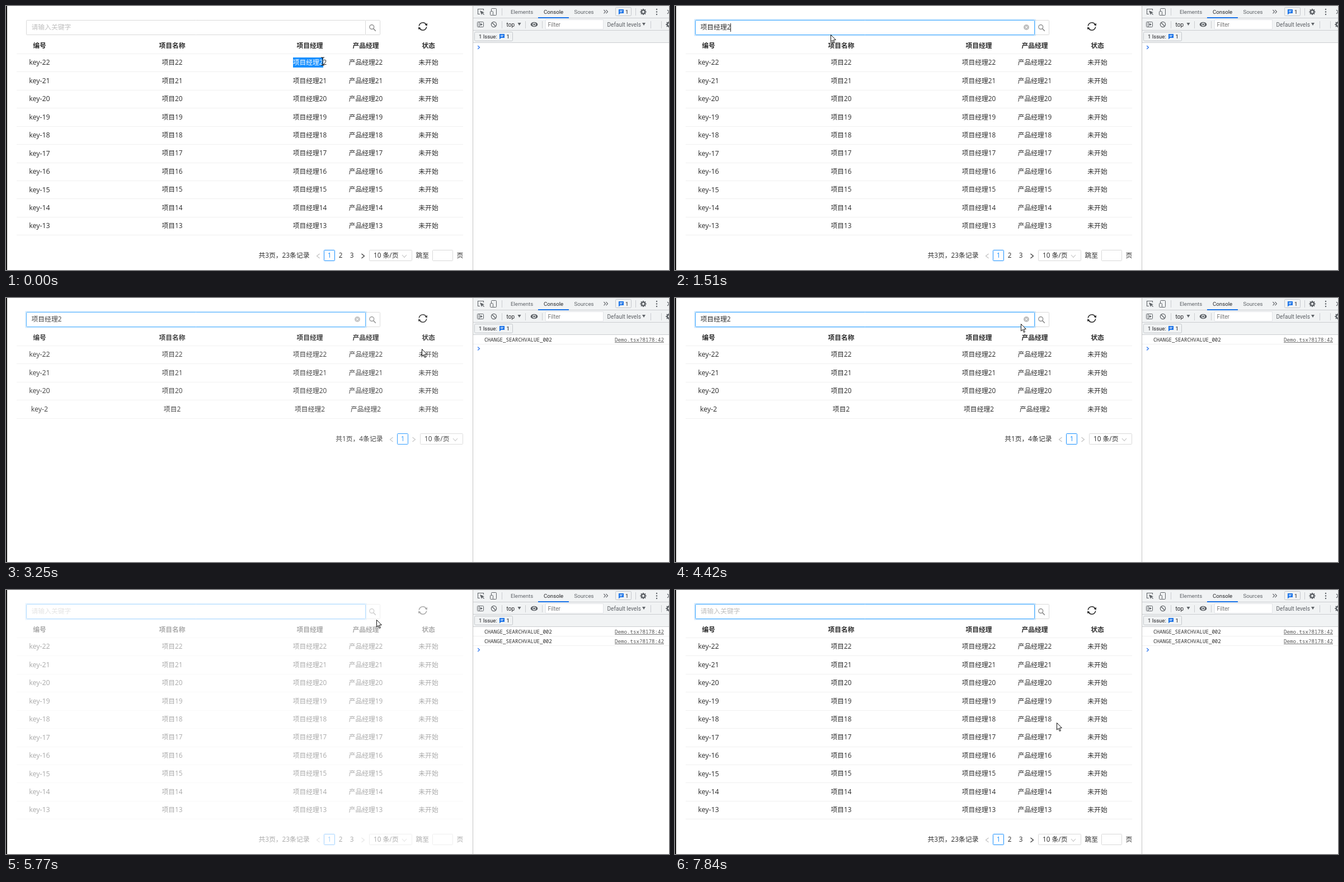
An HTML page with a canvas for the animation above (7.99 s loop, 1185 by 472 pixels).

```html
<!DOCTYPE html>
<html lang="zh">
<head>
<meta charset="utf-8">
<title>Table search</title>
<style>
html, body { margin: 0; width: 100%; height: 100%; overflow: hidden; background: #fff; }
canvas { display: block; width: 1185px; height: 472px; }
</style>
</head>
<body>
<canvas id="stage"></canvas>
<script>
const W = 1185, H = 472, LOOP = 7990;
const canvas = document.getElementById('stage');
const dpr = window.devicePixelRatio || 1;
canvas.width = W * dpr;
canvas.height = H * dpr;
const c = canvas.getContext('2d');

const CJK = "'Open Sans', 'Noto Sans CJK SC', 'Noto Sans CJK', sans-serif";
const UI = "Roboto, 'Noto Sans', sans-serif";
const MONO = "'Noto Sans Mono', 'DejaVu Sans Mono', monospace";
const INK = '#2b2b2b', BLUE = '#1890ff', LINE = '#d9d9d9', PALE = '#bfbfbf', ICON = '#5f6368';
const COLS = [60, 297, 543, 643, 755];
const HEADS = ['编号', '项目名称', '项目经理', '产品经理', '状态'];
const FULL = [22, 21, 20, 19, 18, 17, 16, 15, 14, 13];
const FOUND = [22, 21, 20, 2];

const BURSTS = [0, 280, 670, 1900, 2050, 2320, 2470, 2740, 3130, 3400, 3910, 4180, 4570,
  4720, 4870, 5260, 5770, 6040, 6430, 6700, 7330, 7840, LOOP];

// Pointer path: time, x, y, shape from that time on
const PATH = [
  [0, 566, 99, 'beam'], [160, 566, 99, 'beam'], [520, 549, 91, 'beam'], [670, 525, 80, 'arrow'],
  [910, 330, 44, 'beam'], [1030, 284, 40, 'beam'], [1270, 279, 42, 'beam'], [1390, 278, 46, 'beam'],
  [1510, 278, 51, 'arrow'], [1750, 622, 70, 'arrow'], [1900, 640, 51, 'arrow'], [2050, 652, 41, 'hand'],
  [2320, 654, 40, 'hand'], [2470, 729, 91, 'arrow'], [2980, 743, 91, 'arrow'], [3400, 743, 91, 'arrow'],
  [3760, 759, 89, 'arrow'], [4030, 723, 82, 'arrow'], [4420, 618, 46, 'arrow'], [4570, 629, 40, 'hand'],
  [4720, 629, 38, 'hand'], [4990, 630, 39, 'hand'], [5110, 638, 45, 'arrow'], [5260, 650, 50, 'arrow'],
  [5620, 662, 53, 'arrow'], [6280, 662, 53, 'arrow'], [6430, 686, 200, 'arrow'], [6550, 608, 335, 'arrow'],
  [6700, 598, 370, 'arrow'], [6940, 560, 414, 'arrow'], [7060, 545, 417, 'arrow'], [7210, 545, 417, 'arrow'],
  [7450, 590, 418, 'arrow'], [7690, 637, 390, 'beam'], [7840, 682, 237, 'arrow'], [LOOP, 682, 237, 'arrow']
];

const within = (t, a, b) => t >= a && t < b;
const ramp = (t, a, b) => Math.min(1, Math.max(0, (t - a) / (b - a)));

function snap(t) {
  const i = BURSTS.findIndex((s, k) => within(t, s, BURSTS[k + 1]));
  const start = BURSTS[i];
  const last = Math.max(0, Math.floor((BURSTS[i + 1] - start) / 120) - 1);
  return start + 120 * Math.min(last, Math.floor((t - start) / 120));
}

function rect(x, y, w, h, fill) {
  c.fillStyle = fill;
  c.fillRect(x, y, w, h);
}

function box(x, y, w, h, stroke, fill, r = 1) {
  c.beginPath();
  c.roundRect(x + .5, y + .5, w - 1, h - 1, r);
  if (fill) { c.fillStyle = fill; c.fill(); }
  c.strokeStyle = stroke;
  c.lineWidth = 1;
  c.stroke();
}

function label(s, x, y, { size = 11.8, font = CJK, color = INK, align = 'left', weight = '' } = {}) {
  c.font = `${weight} ${size}px ${font}`;
  c.fillStyle = color;
  c.textAlign = align;
  c.fillText(s, x, Math.round(y + size * .36));
}

function poly(pts, stroke, width = 1, fill, close) {
  c.beginPath();
  for (let i = 0; i < pts.length; i += 2) c.lineTo(pts[i], pts[i + 1]);
  if (close) c.closePath();
  if (fill) { c.fillStyle = fill; c.fill(); }
  if (stroke) { c.strokeStyle = stroke; c.lineWidth = width; c.stroke(); }
}

function arc(x, y, r, stroke, width = 1, a = 0, b = 2 * Math.PI) {
  c.beginPath();
  c.arc(x, y, r, a, b);
  c.strokeStyle = stroke;
  c.lineWidth = width;
  c.stroke();
}

function dot(x, y, r, fill) {
  c.beginPath();
  c.arc(x, y, r, 0, 2 * Math.PI);
  c.fillStyle = fill;
  c.fill();
}

// Angle bracket pointing left (-1) or right (1)
const angle = (x, y, dir, color) =>
  poly([x - 2.5 * dir, y - 4, x + 2.5 * dir, y, x - 2.5 * dir, y + 4], color, 1.1);

function refreshIcon(x, y) {
  for (const turn of [0, Math.PI]) {
    c.save();
    c.translate(x, y);
    c.rotate(turn);
    arc(0, 0, 6.8, INK, 1.5, Math.PI * 1.04, Math.PI * 1.86);
    poly([8.2, -5.6, 7.6, -.8, 3.4, -3], null, 0, INK, true);
    c.restore();
  }
}

function searchBar(t) {
  const hasText = within(t, 1390, 4870);
  const focus = ramp(t, 950, 1200);
  box(642, 25, 27, 27, within(t, 2050, 2590) ? '#40a9ff' : LINE);
  box(36, 25, 607, 27, LINE, '#fff');
  if (focus) {
    c.globalAlpha = focus;
    c.strokeStyle = 'rgba(24,144,255,.2)';
    c.lineWidth = 1.6;
    c.strokeRect(35.2, 24.2, 608.6, 28.6);
    box(36, 25, 607, 27, '#40a9ff');
    c.globalAlpha = 1;
  }
  arc(653.8, 37.5, 3.9, '#7d7d7d', 1.2);
  poly([656.7, 40.5, 660.8, 44.8], '#7d7d7d', 1.4);

  label(hasText ? '项目经理2' : '请输入关键字', 45.5, 38, { color: hasText ? INK : PALE });
  if (hasText) {
    dot(628, 38, 5, within(t, 4570, 4870) ? '#8c8c8c' : PALE);
    poly([626, 36, 630, 40], '#fff');
    poly([630, 36, 626, 40], '#fff');
  }
  const typedCaret = t < 2050 || within(t, 2470, 2980) || within(t, 3520, 4030) || t >= 4570;
  const caret = hasText ? typedCaret
    : t < 1390 ? within(t, 1030, 1390)
    : (t + 10) % 1000 < 500;
  if (caret) rect(hasText ? 99 : 46, 31, 1, 15, '#222');
}

function table(t, rows) {
  HEADS.forEach((h, i) => label(h, COLS[i], 71, { align: 'center', weight: 'bold' }));
  for (let i = 0; i <= rows.length; i++) rect(19, Math.round(85 + 32.42 * i), 798, 1, '#f0f0f0');
  rows.forEach((n, i) => {
    const y = 101 + 32.44 * i;
    label('key-' + n, COLS[0], y, { align: 'center', size: 12.4 });
    ['项目' + n, '项目经理' + n, '产品经理' + n, '未开始'].forEach((s, k) =>
      label(s, COLS[k + 1], y, { align: 'center' }));
  });
  if (t < 1030) {
    c.save();
    c.beginPath();
    c.rect(513, 92, 54, 18);
    c.clip();
    rect(513, 92, 54, 18, BLUE);
    label('项目经理22', COLS[2], 101, { align: 'center', color: '#fff' });
    c.restore();
  }
}

function pager(full, hasNext) {
  const y = full ? 446 : 252, dx = full ? 0 : 131, sx = full ? 650 : 741;
  label(full ? '共3页，23条记录' : '共1页，4条记录', 542.5 + dx, y, { align: 'right' });
  angle(558 + dx, y + 1, -1, PALE);
  box(568 + dx, y - 10, 20, 20, BLUE);
  label('1', 578 + dx, y, { align: 'center', color: BLUE, weight: 500 });
  angle(full ? 638 : 729, y + 1, 1, hasNext ? INK : PALE);
  box(sx - 1, y - 10, 77, 20, LINE);
  label('10 条/页', sx + 7, y);
  poly([sx + 58, y - 1, sx + 62, y + 3.5, sx + 66, y - 1], PALE, 1.1);
  if (!full) return;
  label('2', 598, y, { align: 'center' });
  label('3', 618, y, { align: 'center' });
  label('跳至', 732.5, y);
  box(762, y - 10, 37, 20, LINE);
  label('页', 805.5, y);
}

function spinner(t, y) {
  for (let i = 0; i < 4; i++) {
    const a = (33 + (t - 2470) * .3 + i * 90) * Math.PI / 180;
    c.globalAlpha = .36 + .12 * Math.cos((t - 2470) / 320 - (i - 3) * 1.26);
    dot(418.5 + 6 * Math.cos(a), y + 6 * Math.sin(a), 2.9, BLUE);
  }
  c.globalAlpha = 1;
}

function page(t) {
  const full = !within(t, 3130, 5770);
  searchBar(t);
  refreshIcon(745, 36.5);
  table(t, full ? FULL : FOUND);
  pager(full, full && !within(t, 5770, 5890));
  const veil = ramp(t, 2320, 2470) - ramp(t, 3080, 3290) + ramp(t, 4800, 5110) - ramp(t, 5770, 6160);
  rect(3, 0, 831, H, `rgba(255,255,255,${.6 * veil})`);
  if (within(t, 2470, 3130)) spinner(t, 182);
  if (within(t, 4870, 5770)) spinner(t, 144);
}

function gear(x, y) {
  for (let i = 0; i < 8; i++) {
    const a = i * Math.PI / 4;
    poly([x, y, x + 5.6 * Math.cos(a), y + 5.6 * Math.sin(a)], ICON, 2);
  }
  dot(x, y, 4.3, ICON);
  dot(x, y, 1.9, '#f1f3f4');
}

function issueIcon(x, y) {
  poly([x, y, x + 9, y, x + 9, y + 7, x + 3, y + 7, x, y + 9.5], null, 0, '#1a73e8', true);
  rect(x + 2, y + 2, 5, 1, '#fff');
  rect(x + 2, y + 4, 4, 1, '#fff');
}

const caretDown = (x, y) => poly([x - 3, y - 2.5, x + 3, y - 2.5, x, y + 2.5], null, 0, ICON, true);

function devtools(t) {
  const ui = { font: UI, size: 9.7, color: '#5f6368' }, dark = { ...ui, color: '#202124' };
  rect(834, 0, 351, H, '#fff');
  rect(834, 0, 351, 66, '#f1f3f4');
  for (const y of [21, 43, 65]) rect(834, y, 351, 1, '#cbcdd1');
  rect(834, 0, 1, H, '#c4c4c4');

  // Tab strip
  poly([847, 14.5, 843.5, 14.5, 843.5, 5.5, 853.5, 5.5, 853.5, 8], ICON, 1.1);
  poly([847, 8, 855, 11.5, 851.5, 12.5, 850, 16], null, 0, ICON, true);
  poly([851, 12, 854.5, 15.5], ICON, 1.3);
  box(867, 4, 10, 13, ICON);
  box(865, 9, 6, 8, ICON, '#f1f3f4');
  rect(886, 4, 1, 13, '#cbcdd1');
  label('Elements', 902, 10.5, ui);
  label('Console', 961, 10.5, dark);
  label('Sources', 1015.5, 10.5, ui);
  rect(951, 20, 55, 2, '#1a73e8');
  for (const x of [1068.5, 1072.5]) poly([x, 7, x + 3, 10.2, x, 13.4], ICON, 1.1);
  box(1089, 2, 29, 16, '#c4c7cb', '#f1f3f4', 2);
  issueIcon(1095, 6);
  label('1', 1107, 10.5, dark);
  rect(1125, 4, 1, 13, '#cbcdd1');
  gear(1139, 10.5);
  for (const y of [6, 10.5, 15]) dot(1163, y, 1.2, ICON);
  poly([1182, 7, 1189, 14], ICON, 1.2);
  poly([1182, 14, 1189, 7], ICON, 1.2);

  // Filter strip
  box(842, 28, 12, 10, ICON);
  rect(845, 28, 1, 10, ICON);
  poly([847.5, 30.5, 852, 33, 847.5, 35.5], null, 0, ICON, true);
  arc(872, 33, 4.6, ICON, 1.3);
  poly([868.8, 29.8, 875.2, 36.2], ICON, 1.3);
  for (const x of [886, 928, 958, 1152, 1171]) rect(x, 27, 1, 13, '#cbcdd1');
  label('top', 894.5, 33, { ...dark, size: 10 });
  caretDown(917.5, 32.5);
  c.beginPath();
  c.ellipse(944, 33, 6.4, 4.3, 0, 0, 2 * Math.PI);
  c.fillStyle = ICON;
  c.fill();
  dot(944, 33, 2.9, '#f1f3f4');
  dot(944, 33, 1.7, ICON);
  box(964, 24, 104, 18, '#e3e5e8', '#fff', 0);
  label('Filter', 968.5, 33.5, { ...ui, size: 10, color: '#757575' });
  label('Default levels', 1074.5, 33, { ...ui, size: 10.1 });
  caretDown(1140, 32.5);
  gear(1185, 33);

  // Issue strip
  box(837, 46, 69, 17, '#c4c7cb', '#f1f3f4', 2);
  label('1 Issue:', 845, 54.5, { ...dark, size: 9.5 });
  issueIcon(882, 50);
  label('1', 894.5, 54.5, dark);

  // Messages and prompt
  const logs = (t >= 2470) + (t >= 4990);
  const mono = { font: MONO, size: 9.17, color: '#303030' };
  for (let i = 0; i < logs; i++) {
    const y = 75 + 16.5 * i;
    label('CHANGE_SEARCHVALUE_002', 855, y, mono);
    label('Demo.tsx?8178:42', 1176, y, { ...mono, color: '#545454', align: 'right' });
    rect(1088, Math.round(y + 4), 88, 1, '#777');
    rect(835, Math.round(y + 7), 350, 1, '#f0f0f0');
  }
  const py = 74 + 16.5 * logs;
  poly([843.2, py - 3, 846.4, py, 843.2, py + 3], '#367cf1', 1.4);
}

const SHAPES = {
  arrow() {
    poly([.5, .5, .5, 13, 3.4, 10.4, 5.4, 15.4, 7.4, 14.6, 5.3, 9.8, 9.3, 9.5], '#111', 1, '#fff', true);
  },
  beam() {
    poly([-3, -7, -.8, -7, 0, -6, .8, -7, 3, -7], '#111', 1.1);
    poly([-3, 7, -.8, 7, 0, 6, .8, 7, 3, 7], '#111', 1.1);
    poly([0, -6.5, 0, 6.5], '#111', 1.1);
  },
  hand() {
    poly([-1.5, 10, -1.5, 1, 0, 0, 1.5, 1, 1.5, 6, 4, 6, 6.5, 7, 9, 8, 9.5, 12, 8, 17.5,
      0, 17.5, -4.5, 11.5, -4, 9.5], '#111', 1, '#fff', true);
    for (const x of [4, 6.7]) poly([x, 7, x, 10], '#111', .8);
  }
};

function pointer(t) {
  const i = PATH.findIndex((k, n) => within(t, k[0], PATH[n + 1][0]));
  const [t0, x0, y0, shape] = PATH[i], [t1, x1, y1] = PATH[i + 1];
  const p = ramp(t, t0, t1);
  c.save();
  c.translate(Math.round(x0 + (x1 - x0) * p), Math.round(y0 + (y1 - y0) * p));
  SHAPES[shape]();
  c.restore();
}

function draw(now) {
  const t = snap(now % LOOP);
  c.setTransform(dpr, 0, 0, dpr, 0, 0);
  rect(0, 0, W, H, '#fff');
  page(t);
  rect(0, 0, 2, H, '#111');
  devtools(t);
  pointer(t);
}

const origin = performance.now();
function tick() {
  draw(performance.now() - origin);
  requestAnimationFrame(tick);
}
tick();
</script>
</body>
</html>
```
